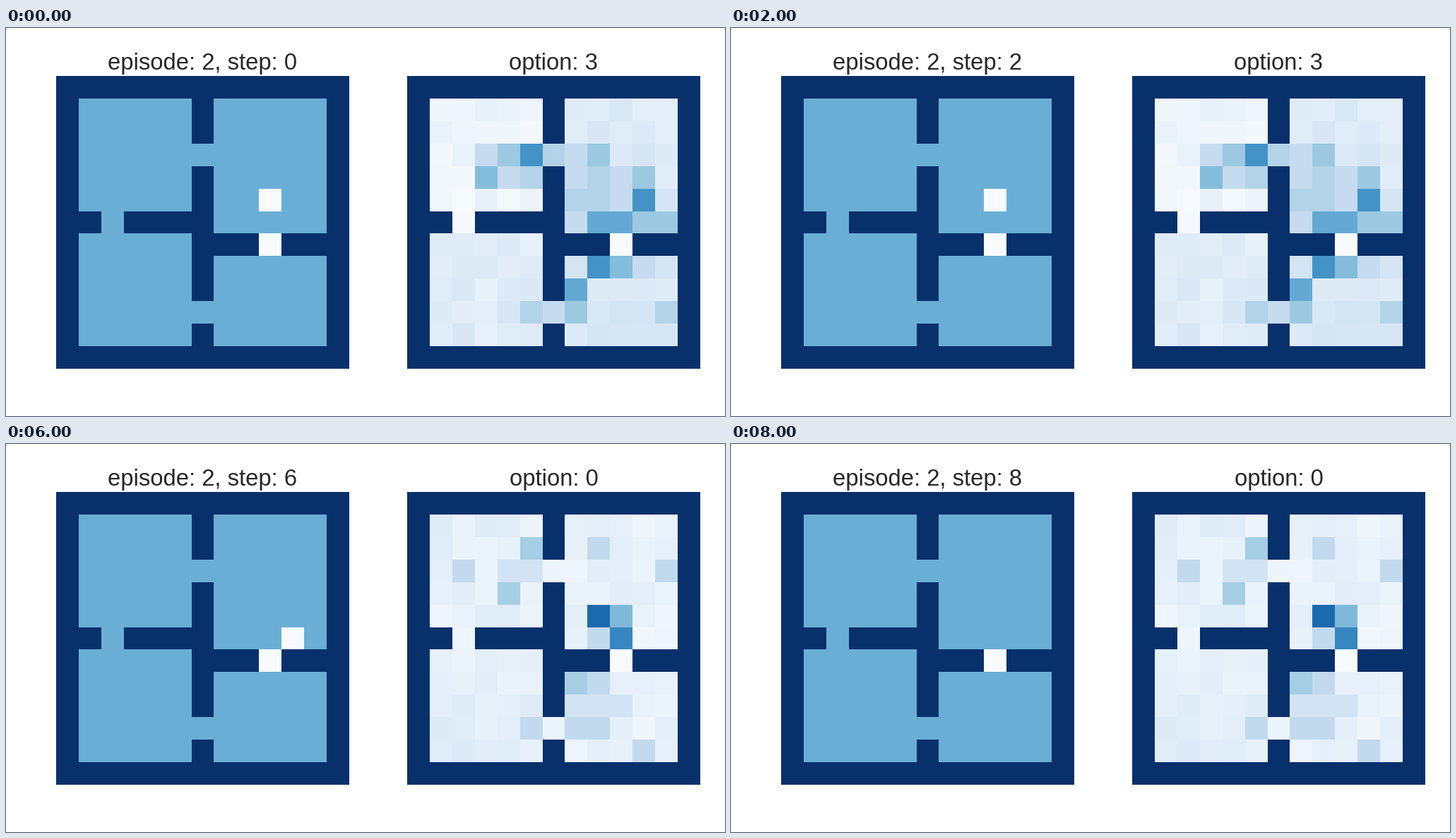
A matplotlib script for the animation above (9 s loop, 1018x550 px).

```python
import numpy as np
import matplotlib.pyplot as plt
from matplotlib.animation import FuncAnimation

W, H, DPI = 1018, 550, 100
N, SIDE, TOP = 13, 415, 68
LEFT_X, RIGHT_X = 71, 568
INK = "#262626"
WALL, FLOOR, MARK = 1.0, 0.5, 0.0
GOAL = (7, 9)

# Agent moves (row, column) from its start, one per step
START = (5, 9)
LEFT, RIGHT, UP, DOWN = (0, -1), (0, 1), (-1, 0), (1, 0)
MOVES = [LEFT, RIGHT, RIGHT, DOWN, UP, DOWN, LEFT, DOWN]
PATH = [tuple(p) for p in np.cumsum([START] + MOVES, axis=0)]


def option_at(step):
    return 0 if 3 <= step <= 6 or step == 8 else 3


def four_rooms():
    free = np.zeros((N, N), bool)
    free[1:6, 1:6] = free[7:12, 1:6] = True
    free[1:7, 7:12] = free[8:12, 7:12] = True
    for door in [(3, 6), (6, 2), GOAL, (10, 6)]:
        free[door] = True
    return free


def heat_map(seed, rooms, spots):
    """Pale noise around one level per room, with hot spots on top."""
    row, col = np.indices((N, N))
    base = np.array(rooms)[(row > 6).astype(int), (col > 6).astype(int)]
    noise = np.random.default_rng(seed).uniform(-0.04, 0.04, (N, N))
    grid = np.clip(base + noise, 0, 1)
    for level, cells in spots.items():
        for cell in cells:
            grid[cell] = level
    grid[GOAL] = MARK
    return np.where(FREE, grid, WALL)


def room_map(agent):
    grid = np.where(FREE, FLOOR, WALL)
    grid[GOAL] = grid[agent] = MARK
    return grid


FREE = four_rooms()
HEAT = {
    0: heat_map(4, [[0.08, 0.07], [0.09, 0.06]], {
        0.78: [(5, 8)],
        0.67: [(6, 9)],
        0.45: [(5, 9)],
        0.35: [(2, 5), (4, 4), (8, 7)],
        0.26: [(3, 2), (2, 8), (3, 11), (6, 8), (8, 8),
               (10, 5), (10, 7), (10, 8), (11, 10)],
        0.19: [(3, 4), (3, 5), (9, 7), (9, 8), (9, 9)],
    }),
    3: heat_map(7, [[0.04, 0.14], [0.12, 0.15]], {
        0.62: [(3, 5), (5, 10), (8, 8)],
        0.52: [(6, 9), (9, 7), (6, 8)],
        0.44: [(4, 3), (8, 9)],
        0.38: [(3, 4), (6, 10), (6, 11), (3, 8), (4, 10), (10, 7)],
        0.31: [(3, 6), (4, 5), (4, 8), (5, 7), (5, 8), (10, 5), (10, 11)],
        0.25: [(3, 3), (4, 4), (3, 7), (4, 7), (4, 9), (5, 9),
               (6, 7), (8, 10), (10, 6)],
    }),
}

plt.rcParams["font.family"] = "Liberation Sans"
fig = plt.figure(figsize=(W / DPI, H / DPI), dpi=DPI, facecolor="white")


def panel(x, grid):
    ax = fig.add_axes([x / W, 1 - (TOP + SIDE) / H, SIDE / W, SIDE / H])
    ax.axis("off")
    mesh = ax.pcolormesh(grid, cmap="Blues", vmin=0, vmax=1)
    ax.set(xlim=(0, N), ylim=(N, 0))
    title = fig.text((x + SIDE / 2) / W, 1 - 59 / H, "", color=INK,
                     size=32.8 * 72 / DPI, ha="center", va="baseline")
    return mesh, title


room, room_title = panel(LEFT_X, room_map(START))
heat, heat_title = panel(RIGHT_X, HEAT[option_at(0)])


def draw(step):
    option = option_at(step)
    room.set_array(room_map(PATH[step]))
    heat.set_array(HEAT[option])
    room_title.set_text(f"episode: 2, step: {step}")
    heat_title.set_text(f"option: {option}")
    return room, heat, room_title, heat_title


anim = FuncAnimation(fig, draw, frames=len(PATH), interval=1000,
                     repeat=True, repeat_delay=0)
plt.show()
```
